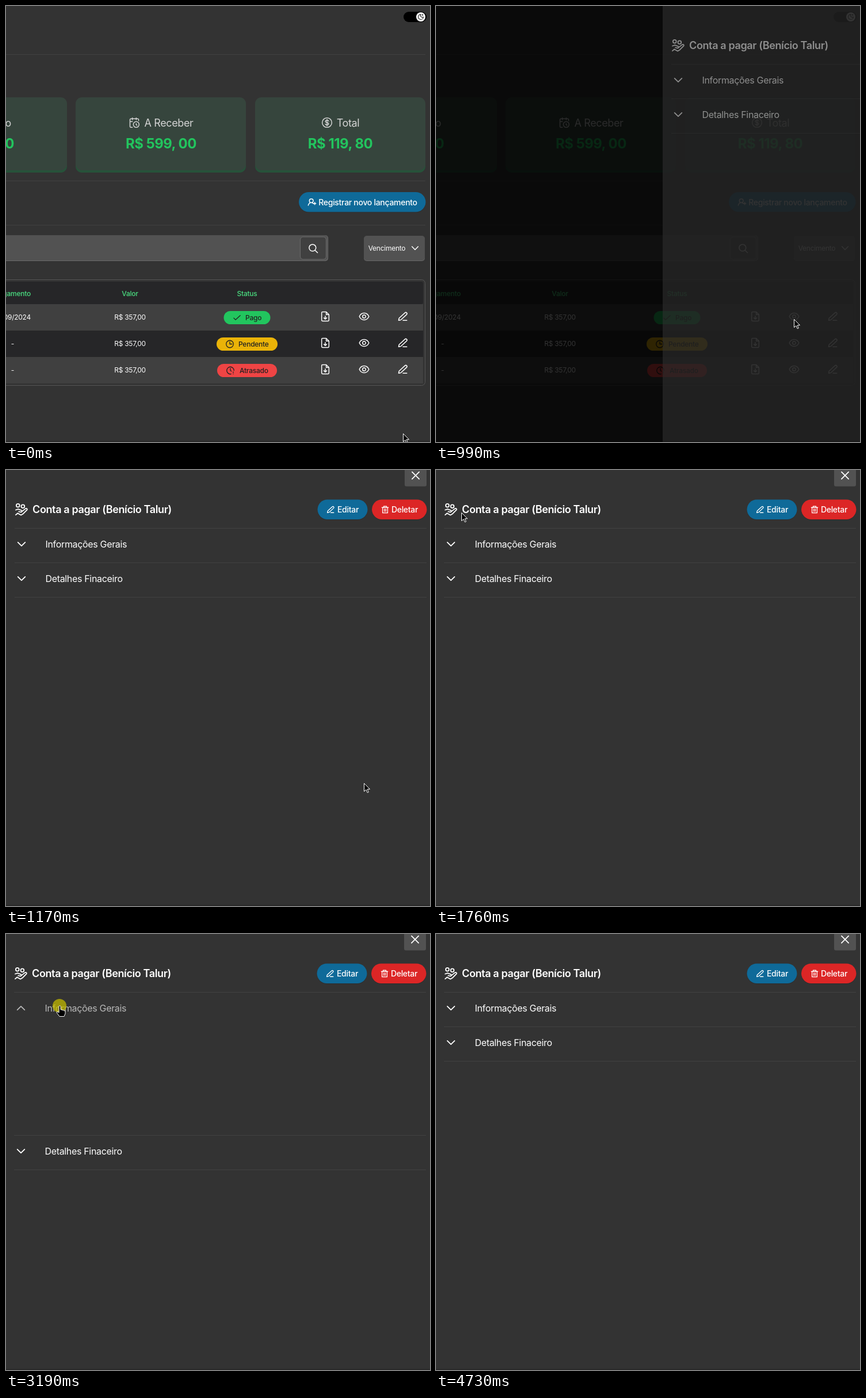
An HTML page that plays this animation: 737x759 px, repeating every 5.26 s.

```html
<!DOCTYPE html>
<html lang="pt-BR">
<head>
<meta charset="utf-8">
<title>Contas</title>
<style>
html, body { margin: 0; width: 100%; height: 100%; overflow: hidden; background: #333; }
svg { display: block; font: 400 12px Inter, sans-serif; }
text { letter-spacing: -.021em; }
.icon { fill: none; stroke-linecap: round; stroke-linejoin: round; }
.medium { font-weight: 500; }
.semi { font-weight: 600; }
.bold { font-weight: 700; }
.line { stroke: #414141; }
</style>
</head>
<body>
<svg id="stage" width="737" height="759" viewBox="0 0 737 759"></svg>
<script>
const LOOP = 5260, FRAME = 65, PANEL = 189;
const stage = document.getElementById('stage');

// Outline icons on a 24 unit grid
const icons = {
  calendar: 'M21 8V6a2 2 0 0 0-2-2H5a2 2 0 0 0-2 2v14a2 2 0 0 0 2 2h3M16 2v4M8 2v4M3 10h5M16 14v2.5l1.6 1M22 16a6 6 0 1 1-12 0a6 6 0 0 1 12 0Z',
  dollar: 'M22 12a10 10 0 1 1-20 0a10 10 0 0 1 20 0ZM15.5 9q-.5-2-3.5-2t-3.4 2.3Q8.7 11.5 12 12t3.4 2.6Q15 17 12 17t-3.5-2M12 5.5v13',
  user: 'M15 9A5 5 0 1 1 5 9a5 5 0 0 1 10 0ZM2 21q2-7 8-7 4 0 6 3M19 13v6M16 16h6',
  search: 'M18 10.5a7.5 7.5 0 1 1-15 0a7.5 7.5 0 0 1 15 0ZM16 16l5.5 5.5',
  chevron: 'M4 8l8 8 8-8',
  file: 'M14 2H6a2 2 0 0 0-2 2v16a2 2 0 0 0 2 2h12a2 2 0 0 0 2-2V8ZM14 2v6h6M12 11v7M9 15l3 3 3-3',
  eye: 'M1.5 12Q5 4.5 12 4.5T22.5 12Q19 19.5 12 19.5T1.5 12ZM15.5 12a3.5 3.5 0 1 1-7 0a3.5 3.5 0 0 1 7 0Z',
  pen: 'M12 21h9M16.5 3.5a2.1 2.1 0 0 1 4 4L7 20l-5 1 1-5Z',
  check: 'M3 13l5 5L21 6',
  clock: 'M22 12a10 10 0 1 1-20 0a10 10 0 0 1 20 0ZM12 6v6h6',
  late: 'M14 21.8A10 10 0 1 1 22 12M12 6v6l3 2M20 16v2M20 21.5v.1',
  moon: 'M12 3a6.5 6.5 0 0 0 9 9a9 9 0 1 1-9-9ZM18 3v4M16 5h4',
  trash: 'M3 6h18M5 6v15h14V6M8 6V2.500h8V6M10 10v7M14 10v7',
  close: 'M5 5l14 14M19 5L5 19',
  coins: 'M8.500 4.500a3 3 0 1 1-6 0a3 3 0 0 1 6 0ZM17.500 6a3 3 0 1 1-6 0a3 3 0 0 1 6 0ZM1.500 12.500l4.500-1.500 6 2.500q2 2-1 3l-4-1M12.500 15.500l7-5.500q3.500-.5 2.500 2.500l-7 7-4 2.500-6-3.500-3.500 3'
};
const icon = (name, x, y, size, color = '#fff', width = 1.5, id = '') =>
  `<g transform="translate(${x} ${y})"><path ${id && `id="${id}"`} class="icon" d="${icons[name]}" stroke="${color}"
    stroke-width="${width * 24 / size}" transform="scale(${size / 24}) translate(-12 -12)"/></g>`;
const text = (s, x, y, size = 12, color = '#fff', cls = '', anchor = 'start') =>
  `<text x="${x}" y="${y}" font-size="${size}" fill="${color}" class="${cls}" text-anchor="${anchor}">${s}</text>`;
const box = (x, y, w, h, fill, r = 0, extra = '') =>
  `<rect x="${x}" y="${y}" width="${w}" height="${h}" rx="${r}" fill="${fill}" ${extra}/>`;
const line = (x1, x2, y) => `<path class="line" d="M${x1} ${y + .5}H${x2}"/>`;
const pill = (x, y, w, h, fill) =>
  box(x, y + 1, w, h, '#0002', h / 2) + box(x, y, w, h, fill, h / 2);

const card = x => box(x, 162, 296, 128, '#27523a', 11) + box(x, 159, 296, 127, '#36453d', 11);

function tableRow(i, date, status, color, badgeX, badgeW, mark, labelX) {
  const y = 542 + 46 * i;
  return box(0, y - 23, 725, 46, i % 2 ? '#262628' : '#404040') +
    (date === '-' ? text('-', 11.5, y + 4, 12, '#fff', '', 'middle') : text(date, 43, y + 4, 12, '#fff', '', 'end')) +
    text('R$ 357,00', 215.5, y + 4, 12, '#fff', '', 'middle') +
    box(badgeX, y - 11, badgeW, 23, color, 11.5) +
    icon(mark, badgeX + 23, y + .5, 15, '#222', 1.3) +
    text(status, labelX, y + 4.5, 12, '#222', 'medium') +
    icon('file', 555, y - 1.5, 19) +
    icon('eye', 622.5, y - 1.5, 19, '#fff', 1.5, i ? '' : 'eye') +
    icon('pen', 690, y - 1.5, 18);
}

const page = box(0, 0, 737, 759, '#333') +
  box(691, 10, 40, 18, '#000', 9) + `<circle cx="721" cy="19" r="8" fill="#fff"/>` +
  icon('moon', 721, 19, 12, '#222', 1.1) +
  [84, 304, 381].map(y => line(0, 729, y)).join('') +
  [-190, 121, 433].map(card).join('') +
  text('Pago', 9, 210, 18, '#d4d4d4', '', 'end') +
  text('R$ 239, 00', 14, 248, 24, '#22c55e', 'bold', 'end') +
  icon('calendar', 223, 203, 20, '#d4d4d4') + text('A Receber', 283, 210, 18, '#d4d4d4', '', 'middle') +
  text('R$ 599, 00', 269.5, 248, 24, '#22c55e', 'bold', 'middle') +
  icon('dollar', 558, 203, 20, '#d4d4d4') + text('Total', 594.5, 210, 18, '#d4d4d4', '', 'middle') +
  text('R$ 119, 80', 581, 248, 24, '#22c55e', 'bold', 'middle') +
  pill(509, 324, 220.5, 34.5, '#0f6a99') + icon('user', 532, 341, 16) +
  text('Registrar novo lançamento', 629, 347, 14, '#fff', 'medium', 'middle') +
  box(-10, 399, 570, 45, '#686868', 5) + box(-10, 399, 569, 44, '#525252', 5) +
  box(511.5, 402, 45, 39, '#404040', 5, 'stroke="#6b6b6b"') + icon('search', 534, 422, 19) +
  box(622, 401, 106, 43, '#666', 5) + box(622, 400, 106, 43, '#525252', 5) +
  text('Vencimento', 662, 426, 12, '#fff', '', 'middle') + icon('chevron', 711, 421.5, 16) +
  box(-10, 476.5, 738.5, 184, 'none', 6, 'stroke="#565656"') +
  box(-10, 480, 735, 39, '#262628', 3) +
  text('Pagamento', 43, 504.5, 12, '#4ade80', 'medium', 'end') +
  text('Valor', 215.5, 504.5, 12, '#4ade80', 'medium', 'middle') +
  text('Status', 419, 504.5, 12, '#4ade80', 'medium', 'middle') +
  tableRow(0, '23/09/2024', 'Pago', '#22c55e', 378.5, 81, 'check', 416) +
  tableRow(1, '-', 'Pendente', '#eab308', 366, 106, 'clock', 404) +
  tableRow(2, '-', 'Atrasado', '#ef4444', 367, 104, 'late', 406);

const sheetRow = (n, label, y) =>
  `<g id="row${n}"><g id="label${n}"><g id="arrow${n}">${icon('chevron', 26, y, 19, '#fff', 1.8)}</g>
    ${text(label, 67.5, y + 6, 16)}</g></g>`;

const sheet = box(-1, 0, 738, 759, '#333') +
  box(692, -10, 38, 38.5, '#525252', 3) + icon('close', 711, 9.5, 21, '#fff', 1.8) +
  icon('coins', 26, 69, 23, '#fff', 1.8) +
  text('Conta a pagar (Benício Talur)', 45, 75, 18, '#fff', 'semi') +
  pill(540.5, 51.5, 87, 34.5, '#0f6a99') + icon('pen', 563.5, 69, 14, '#fff', 1.3) +
  text('Editar', 593.5, 74, 14, '#fff', 'medium', 'middle') +
  pill(635, 51.5, 95.5, 34.5, '#dc2626') + icon('trash', 658, 69, 15, '#fff', 1.3) +
  text('Deletar', 692, 74, 14, '#fff', 'medium', 'middle') +
  line(14, 730, 101) + sheetRow(1, 'Informações Gerais', 129) +
  `<g id="middle">${line(14, 730, 161)}</g>` + sheetRow(2, 'Detalhes Finaceiro', 189) +
  `<g id="bottom">${line(14, 730, 221)}</g>`;

stage.innerHTML = page + `<rect id="shade" width="737" height="759" fill-opacity=".8"/>
  <g id="sheet">${sheet}</g>${box(0, 757, 737, 2, '#0003')}
  <g id="cursor"><circle id="press" r="12" fill="#c2b800" fill-opacity=".75"/>
  <path id="pointer" stroke="#fff" stroke-linejoin="round"/></g>`;

const part = Object.fromEntries([...stage.querySelectorAll('[id]')].map(el => [el.id, el]));
const set = (el, name, value) => el.setAttribute(name, value);
const show = (el, on) => set(el, 'visibility', on ? 'visible' : 'hidden');
const shift = (el, x, y) => set(el, 'transform', `translate(${x} ${y})`);
const within = (t, a, b) => t >= a && t < b;
const smooth = p => p * p * (3 - 2 * p);
const ramp = (t, a, b) => smooth(Math.min(1, Math.max(0, (t - a) / (b - a))));

const ARROW = 'M.5 .5V14.5L4 11.5 6.2 16.700 8.300 15.800 6.100 10.700H10.500Z';
const HAND = 'M-1 1.500a1.500 1.500 0 0 1 3 0V6.500l6 1.500q2 .5 2 2.500v3l-2 5H0l-4.500-6q-1-2.500 1.500-2l2 1.500Z';
// Cursor path: time, x, y
const path = [[20, 690, 744], [560, 622, 545], [1200, 622, 545], [1690, 43, 73], [1740, 43, 73], [1970, 88, 113],
  [2080, 88, 113], [2120, 91, 106], [2330, 93, 125], [3190, 93, 125], [3450, 95, 199], [4530, 95, 199], [4670, 400, 733]];

function cursorAt(t) {
  const i = path.findIndex(p => p[0] > t);
  if (i === 0) return path[0].slice(1);
  if (i < 0) return path.at(-1).slice(1);
  const [a, ax, ay] = path[i - 1], [b, bx, by] = path[i], p = ramp(t, a, b);
  return [ax + (bx - ax) * p, ay + (by - ay) * p].map(Math.round);
}

function draw(t) {
  const held = t - (t - 5) % FRAME;

  const open = t >= 990;
  const offset = t < 1100 ? 395 : t < 1170 ? 40 : t < 1230 ? 1 : 0;
  show(part.shade, open);
  show(part.sheet, open);
  shift(part.sheet, offset, 0);
  set(part.sheet, 'opacity', 1 - offset / 850);
  set(part.eye.parentNode, 'transform', `translate(622.5 540.5) scale(${within(t, 520, 990) ? 1.22 : 1})`);

  const closing = [ramp(held, 3190, 3390), ramp(held, 4510, 4660)];
  const first = t < 2590 ? 0 : PANEL * (1 - closing[0]);
  const second = t < 3990 ? 0 : PANEL * (1 - closing[1]);
  shift(part.middle, 0, first);
  shift(part.row2, 0, first);
  shift(part.bottom, 0, first + second);

  const turns = [ramp(held, 2530, 2725) - closing[0], ramp(held, 3930, 4130) - closing[1]];
  turns.forEach((turn, i) => set(part['arrow' + (i + 1)], 'transform', `rotate(${180 * turn} 26 ${129 + 60 * i})`));
  set(part.label1, 'opacity', within(t, 2120, 3330) ? .65 : 1);
  set(part.label2, 'opacity', within(t, 3395, 4600) ? .65 : 1);

  shift(part.cursor, ...cursorAt(held));
  set(part.pointer, 'd', within(t, 2120, 4540) ? HAND : ARROW);
  show(part.cursor, t < 4730);
  const pressed = [[780, 910], [2460, 2590], [3070, 3200], [3860, 3990], [4470, 4540]].some(([a, b]) => within(t, a, b));
  set(part.press, 'display', pressed ? 'inline' : 'none');
}

function tick() {
  draw(performance.now() % LOOP);
  requestAnimationFrame(tick);
}
tick();
</script>
</body>
</html>
```
